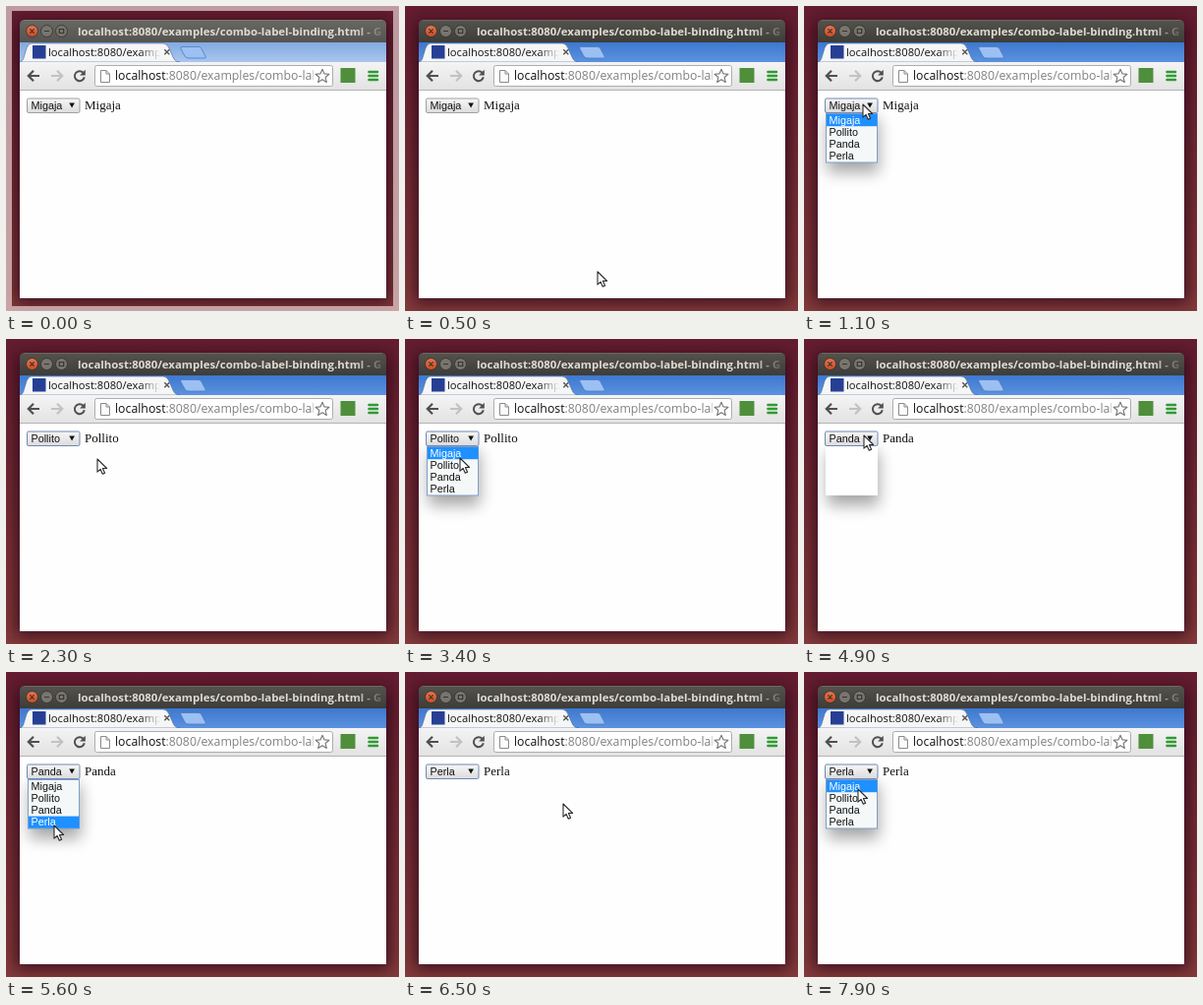
These frames come from a looping animation (400x310 px, 8000 ms). An HTML page:

```html
<!DOCTYPE html>
<html lang="es">
<head>
<meta charset="utf-8">
<title>Combo label binding</title>
<style>
html, body { margin: 0; width: 100%; height: 100%; overflow: hidden; background: #5a1f2d; }
svg { display: block; width: 400px; height: 310px; }
.ui { font-family: Ubuntu, "Open Sans", "Noto Sans", sans-serif; }
.item { font: 10.8px "Liberation Sans", Arial, sans-serif; }
.label { font: 13px "Liberation Serif", "Times New Roman", serif; }
</style>
</head>
<body>
<svg viewBox="0 0 400 310" xmlns="http://www.w3.org/2000/svg">
  <defs>
    <linearGradient id="desk" x2="0" y2="1"><stop stop-color="#641c32"/><stop offset="1" stop-color="#843a3c"/></linearGradient>
    <linearGradient id="bar" x2="0" y2="1"><stop stop-color="#55534d"/><stop offset="1" stop-color="#3d3c38"/></linearGradient>
    <linearGradient id="strip" x2="0" y2="1"><stop stop-color="#3d78cf"/><stop offset="1" stop-color="#5b92df"/></linearGradient>
    <linearGradient id="pale" x2="0" y2="1"><stop stop-color="#83aae0"/><stop offset="1" stop-color="#a9c6ee"/></linearGradient>
    <linearGradient id="tool" x2="0" y2="1"><stop stop-color="#f4f4f4"/><stop offset="1" stop-color="#e2e2e2"/></linearGradient>
    <linearGradient id="btn" x2="0" y2="1"><stop stop-color="#f6f6f6"/><stop offset="1" stop-color="#dcdcdc"/></linearGradient>
    <linearGradient id="orange" x2="0" y2="1"><stop stop-color="#e8754e"/><stop offset="1" stop-color="#cc4a24"/></linearGradient>
    <linearGradient id="fadeTitle" gradientUnits="userSpaceOnUse" x1="355" x2="384"><stop stop-color="#dfdbd2"/><stop offset="1" stop-color="#dfdbd2" stop-opacity=".1"/></linearGradient>
    <linearGradient id="fadeTab" gradientUnits="userSpaceOnUse" x1="136" x2="157"><stop stop-color="#111"/><stop offset="1" stop-color="#111" stop-opacity="0"/></linearGradient>
    <clipPath id="titleClip"><rect x="70" y="14" width="312" height="23"/></clipPath>
    <clipPath id="tabClip"><rect x="40" y="38" width="117" height="19"/></clipPath>
    <clipPath id="urlClip"><rect x="108" y="60" width="204.500" height="22"/></clipPath>
    <clipPath id="pageClip"><rect x="14" y="86" width="373" height="211"/></clipPath>
    <filter id="blur" x="-20%" y="-20%" width="140%" height="140%"><feGaussianBlur stdDeviation="8"/></filter>
    <filter id="soft" x="-80%" y="-80%" width="260%" height="260%"><feGaussianBlur stdDeviation="8"/></filter>
  </defs>

  <rect width="400" height="310" fill="url(#desk)"/>
  <rect x="10" y="16" width="381" height="286" fill="#1c0409" opacity=".68" filter="url(#blur)"/>
  <path id="rim" d="M0 0H400V310H0ZM6 5V305H394V5Z" fill="#efdce0" opacity=".66"/>

  <!-- title bar -->
  <path d="M14 37V19q0-5 5-5H382q5 0 5 5V37Z" fill="url(#bar)"/>
  <path d="M18 14.500H383" stroke="#6b6962"/>
  <path id="barGlow" d="M14 37V19q0-5 5-5H382q5 0 5 5V37Z" fill="#fff" opacity=".12"/>
  <g stroke="#33322e" stroke-width=".8">
    <circle cx="26.500" cy="25.500" r="6" fill="url(#orange)"/>
    <circle cx="41.500" cy="25.500" r="6" fill="#77756d"/>
    <circle cx="56.500" cy="25.500" r="6" fill="#77756d"/>
  </g>
  <path d="M24.300 23.300l4.400 4.400m0-4.400l-4.400 4.400M39 25.500h5M54.300 23.500h4.400v4h-4.400z" fill="none" stroke="#36352f" stroke-width="1.200"/>
  <text class="ui" x="73" y="29.500" font-size="11.400" font-weight="700" fill="url(#fadeTitle)" clip-path="url(#titleClip)">localhost:8080/examples/combo-label-binding.html - G</text>

  <!-- tabs -->
  <rect x="14" y="37" width="373" height="20" fill="url(#strip)"/>
  <rect id="stripGlow" x="14" y="37" width="373" height="20" fill="url(#pale)"/>
  <path d="M14 57C18 56 18 52 20 46Q22 38 26 38H160Q164 38 166 43L170 52Q172 57 177 57Z" fill="#f6f6f6" stroke="#3c669f" stroke-width=".6"/>
  <path d="M179 41.500H196Q198 41.500 199 43.500L203 51Q204 53 202 53H186Q183 53 182 51L178 43.500Q177 41.500 179 41.500Z" fill="#9cc0f2" stroke="#4a7cc4" stroke-width=".8"/>
  <rect x="27" y="40" width="13.500" height="13.500" fill="#263f94"/>
  <text class="ui" x="43" y="51" font-size="11.200" fill="url(#fadeTab)" clip-path="url(#tabClip)">localhost:8080/examples</text>
  <path d="M161.300 44.300l5 5m0-5l-5 5" stroke="#555" stroke-width="1.400"/>

  <!-- toolbar -->
  <rect x="14" y="57" width="373" height="29" fill="url(#tool)"/>
  <path d="M14 85.500H387" stroke="#b4b4b4"/>
  <path d="M34 71H23M28 65.800L22.800 71L28 76.200" fill="none" stroke="#505050" stroke-width="2.200"/>
  <path d="M46 71H57M52 65.800L57.200 71L52 76.200" fill="none" stroke="#c2c2c2" stroke-width="2.200"/>
  <path d="M78.600 67.800A5 5 0 1 0 79.800 72.300" fill="none" stroke="#505050" stroke-width="2"/>
  <path d="M80.800 64.800V70.500H75.100Z" fill="#505050"/>
  <rect x="90.500" y="60.500" width="242" height="21" rx="2" fill="#fff" stroke="#adadad"/>
  <path d="M96.500 65.500H102L105.500 69V77.500H96.500ZM102 65.500V69H105.500" fill="#fcfcfc" stroke="#8a8a8a"/>
  <text class="ui" x="111" y="75" font-size="12.300" fill="#808080" clip-path="url(#urlClip)"><tspan fill="#111">localhost</tspan>:8080/examples/combo-label-binding.html</text>
  <path id="star" fill="#fff" stroke="#777" stroke-width="1.100" stroke-linejoin="round"/>
  <rect x="340.500" y="63" width="15" height="15" fill="#4f8f3c"/>
  <path d="M369.500 67H378M369.500 71H378M369.500 75H378" stroke="#2f9a32" stroke-width="2.600" stroke-linecap="round"/>

  <!-- page -->
  <rect x="14" y="86" width="373" height="211" fill="#fefefe"/>
  <g clip-path="url(#pageClip)">
    <text id="label" class="label" x="80" y="105" fill="#111"></text>
    <rect id="shade" x="24" y="115" width="52" height="54" fill="#000" opacity=".35" filter="url(#soft)"/>
    <rect id="combo" x="21.500" y="94" width="53.500" height="14.500" rx="1.500" fill="url(#btn)"/>
    <text id="value" class="item" x="25.500" y="105" fill="#111"></text>
    <path d="M64.300 98.500H69.900L67.100 103.500Z" fill="#111"/>
    <g id="menu">
      <rect x="22" y="109" width="53" height="50" fill="#fff"/>
      <g id="items">
        <rect x="22.500" y="109.500" width="52" height="49.500" fill="#f5f8f8" stroke="#7f9fc9"/>
        <rect id="hot" x="23" width="51.500" height="12.200" fill="#1e90ff"/>
      </g>
    </g>
  </g>
  <path id="cursor" d="M0 0V13.200L3.100 10.400L5.300 15.300L7.600 14.300L5.400 9.500H9.600Z" fill="#fff" stroke="#2a2a2a" stroke-width="1.100" stroke-linejoin="round"/>
</svg>
<script>
const LOOP = 8000, STEP = 100, ROW = 12.2, TOP = 110, ENTER = 300, HOVER = 600;
const names = ["Migaja", "Pollito", "Panda", "Perla"];
const home = { x: 61, y: 98 };
// each visit opens the list, picks a row, then drifts away before the next one
const visits = [
  { open: 1000, pick: 1900, row: 1, away: { x: 107, y: 119 } },
  { open: 3100, pick: 4300, row: 2, away: { x: 64, y: 122 } },
  { open: 4900, pick: 5900, row: 3, away: { x: 163, y: 134 } },
  { open: 7200, pick: LOOP, row: 0 }
];
const stops = [{ t: ENTER, x: 230, y: 312 }];
visits.forEach((v, i) => {
  const spot = { x: 55 - 2 * v.row, y: TOP + (v.row + 0.75) * ROW };
  stops.push({ t: v.open, ...home }, { t: v.open + HOVER, ...spot }, { t: v.pick, ...spot });
  if (v.away) stops.push({ t: (v.pick + visits[i + 1].open) / 2, ...v.away });
});

const $ = id => document.getElementById(id);
const set = (id, attrs) => { for (const k in attrs) $(id).setAttribute(k, attrs[k]); };
const show = (id, on) => set(id, { visibility: on ? "inherit" : "hidden" });

const rows = names.map((name, i) => {
  const el = document.createElementNS("http://www.w3.org/2000/svg", "text");
  el.setAttribute("class", "item");
  el.setAttribute("x", 25.5);
  el.setAttribute("y", 119.7 + i * ROW);
  el.textContent = name;
  $("items").append(el);
  return el;
});

set("star", { d: "M" + Array.from({ length: 10 }, (_, i) => {
  const a = i * Math.PI / 5, r = i % 2 ? 3.3 : 7.3;
  return (322 + r * Math.sin(a)).toFixed(2) + " " + (71.5 - r * Math.cos(a)).toFixed(2);
}).join("L") + "Z" });

function pointer(t) {
  const i = Math.max(1, stops.findIndex(s => s.t > t));
  const a = stops[i - 1], b = stops[i];
  const k = Math.max(0, (t - a.t) / (b.t - a.t));
  const e = k * k * (3 - 2 * k);
  return [a.x + (b.x - a.x) * e, a.y + (b.y - a.y) * e];
}

function draw(t) {
  const [x, y] = pointer(t).map(Math.round);
  const done = visits.filter(v => v.pick <= t).pop();
  const pick = done ? done.row : 0;
  const open = visits.find(v => t >= v.open && t < v.pick);
  const over = Math.floor((y - TOP) / ROW);
  const hot = names[over] ? over : pick;
  const glow = Math.max(0, 1 - t / 200);

  set("rim", { opacity: 0.66 * glow });
  set("barGlow", { opacity: 0.12 * glow });
  set("stripGlow", { opacity: glow });
  $("label").textContent = $("value").textContent = names[pick];
  set("combo", { stroke: t < visits[0].open ? "#a0a0a0" : "#7088b4" });
  show("menu", open);
  show("shade", open);
  show("items", open && t >= open.open + STEP);
  set("hot", { y: TOP + hot * ROW });
  rows.forEach((el, i) => el.setAttribute("fill", i === hot ? "#fff" : "#111"));
  set("cursor", { transform: `translate(${x} ${y})` });
  show("cursor", t > ENTER);
}

function tick() {
  const t = performance.now() % LOOP;
  draw(Math.floor(t / STEP) * STEP);
  requestAnimationFrame(tick);
}
tick();
</script>
</body>
</html>
```
